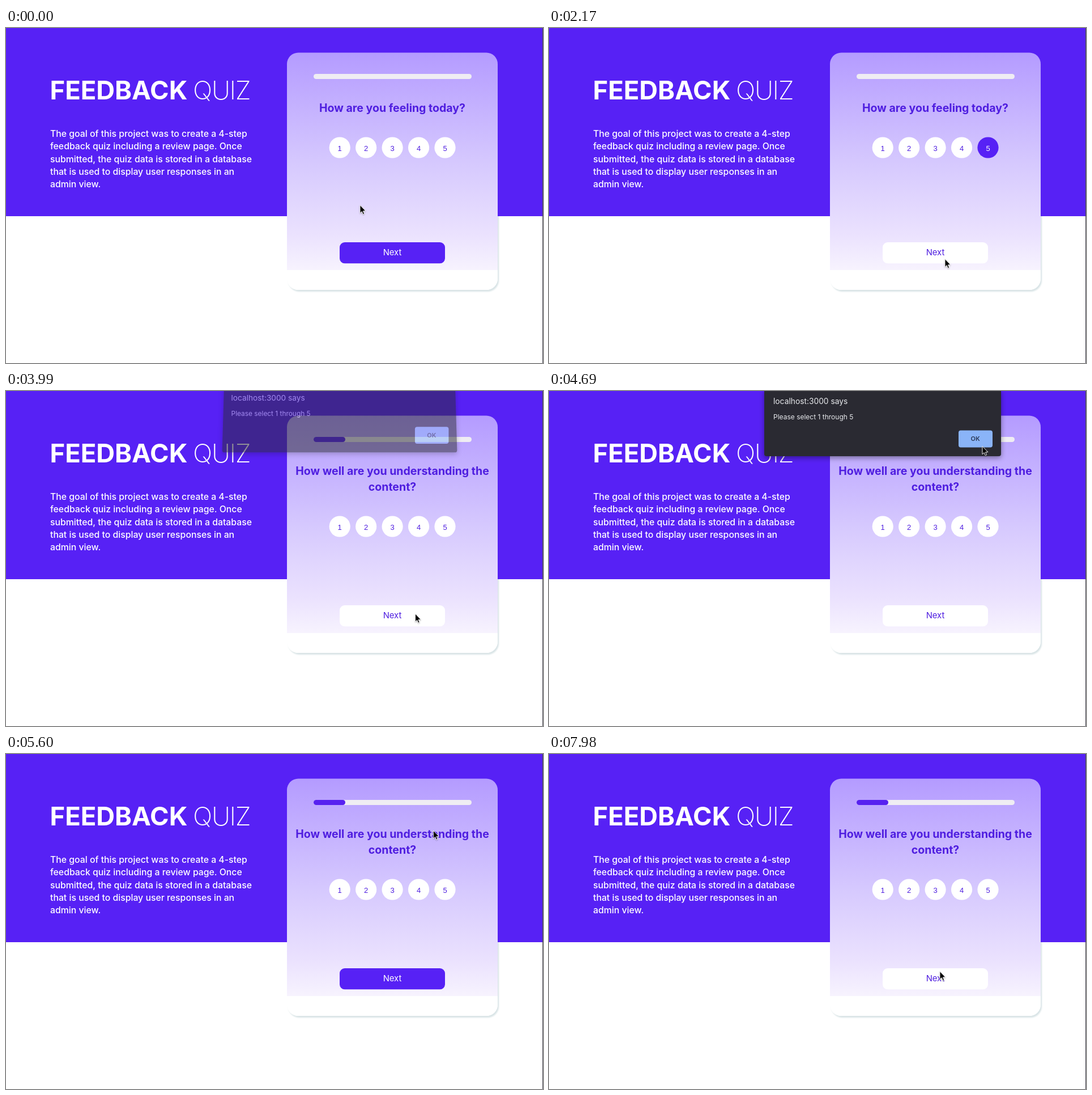
Animation, 948 px wide and 591 px high, one loop 8000 ms. Source, as an HTML page:

```html
<!DOCTYPE html>
<html lang="en">
<head>
<meta charset="utf-8">
<title>Feedback Quiz</title>
<style>
  html, body { margin: 0; width: 100%; height: 100%; overflow: hidden; background: #fff; }
  svg { display: block; width: 948px; height: 591px; }
  text { font-family: Inter, "Open Sans", sans-serif; }
  .body { font-size: 15.8px; font-weight: 500; fill: #fff; }
  .ask { font-size: 19.55px; font-weight: 700; fill: #4f1ee0; text-anchor: middle; }
  .num { font: 13px "Liberation Sans", Arial, sans-serif; text-anchor: middle; }
</style>
</head>
<body>
<svg viewBox="0 0 948 591">
  <defs>
    <linearGradient id="fade" gradientUnits="userSpaceOnUse" x1="0" y1="43" x2="0" y2="462">
      <stop offset="0" stop-color="#b49bff"/>
      <stop offset=".47" stop-color="#d6c9fe"/>
      <stop offset=".77" stop-color="#ebe2fe"/>
      <stop offset=".917" stop-color="#f7f3fe"/>
      <stop offset=".917" stop-color="#fff"/>
    </linearGradient>
    <filter id="cardShadow" x="-5%" y="-5%" width="110%" height="110%">
      <feDropShadow dx="2" dy="3" stdDeviation="0.8" flood-color="#d9e4e6"/>
    </filter>
    <filter id="boxShadow" x="-10%" y="-20%" width="120%" height="150%">
      <feDropShadow dx="0" dy="3" stdDeviation="5" flood-color="#000" flood-opacity=".4"/>
    </filter>
    <filter id="tipShadow" x="-50%" y="-50%" width="200%" height="200%">
      <feDropShadow dx="0" dy="1" stdDeviation="0.8" flood-color="#000" flood-opacity=".35"/>
    </filter>
    <rect id="card" x="496" y="43.5" width="372" height="418.5" rx="20"/>
  </defs>

  <rect width="948" height="591" fill="#fff"/>
  <use href="#card" fill="#fff" filter="url(#cardShadow)"/>
  <rect width="948" height="332" fill="#5721f5"/>
  <text x="77.5" y="126" font-size="45.4" font-weight="700" fill="#fff">FEEDBACK</text>
  <text x="330" y="126" font-size="45.4" font-weight="200" letter-spacing="-1.3" fill="#fff">QUIZ</text>
  <g id="intro"></g>

  <use href="#card" fill="url(#fade)"/>
  <rect x="543" y="81" width="279" height="9" rx="4.5" fill="#efedf3"/>
  <rect id="bar" x="543" y="81" width="56" height="9" rx="4.5" fill="#5721f0"/>
  <text class="ask" id="ask1" x="682" y="148"></text>
  <text class="ask" id="ask2" x="682" y="176"></text>
  <g id="choices"></g>
  <rect id="next" x="589" y="378" width="186" height="37.3" rx="9"/>
  <text id="nextText" x="682" y="401" font-size="14.8" text-anchor="middle">Next</text>

  <g id="dialog">
    <path id="panel" fill="#292c30" filter="url(#boxShadow)"/>
    <text x="396" y="23" font-size="13.8" fill="#e8eaed">localhost:3000 says</text>
    <text x="396" y="50" font-size="12" fill="#e8eaed">Please select 1 through 5</text>
    <rect id="ok" x="723" y="69.5" width="60" height="30" rx="4"/>
    <text x="752.7" y="88.3" font-size="11" font-weight="600" text-anchor="middle" fill="#2b3856">OK</text>
  </g>

  <rect x="947" width="1" height="591" fill="#45434d"/>
  <g id="cursor">
    <circle id="ring" r="20.3" fill="none" stroke="#15131c" stroke-width="1.6"/>
    <path d="M0 -.5V13.6L3.2 10.7L5.3 15.7L7.6 14.7L5.5 9.9L9.9 9.7Z" fill="#000"
      stroke="#fff" stroke-width=".9" stroke-linejoin="round" filter="url(#tipShadow)"/>
  </g>
</svg>
<script>
const LOOP = 8000, STEP = 70;
const PURPLE = '#5721f5', INK = '#4f1ee0';
const $ = id => document.getElementById(id);

function add(parent, tag, attrs, text = '') {
  const el = document.createElementNS('http://www.w3.org/2000/svg', tag);
  for (const k in attrs) el.setAttribute(k, attrs[k]);
  el.textContent = text;
  return parent.appendChild(el);
}
function set(el, attrs) {
  for (const k in attrs) el.setAttribute(k, attrs[k]);
}

[
  'The goal of this project was to create a 4-step',
  'feedback quiz including a review page. Once',
  'submitted, the quiz data is stored in a database',
  'that is used to display user responses in an',
  'admin view.'
].forEach((line, i) => add($('intro'), 'text', { class: 'body', x: 78, y: 192 + i * 22.3 }, line));

const choices = [1, 2, 3, 4, 5].map(n => {
  const x = 589.2 + (n - 1) * 46.45;
  return {
    disc: add($('choices'), 'circle', { cx: x, cy: 211, r: 18.6 }),
    label: add($('choices'), 'text', { class: 'num', x, y: 217 }, n)
  };
});

// Pointer path: time, x, y
const path = [
  [0, 625, 313], [490, 657.5, 302.5], [700, 657.5, 302.5],
  [1470, 777, 214], [1640, 777, 215], [2100, 700, 407], [2170, 699, 408],
  [2450, 710, 392], [2590, 711, 390.5], [2730, 711, 390.5],
  [3290, 733, 397], [3640, 722.5, 393.5], [4060, 722.5, 393.5],
  [4620, 765, 98], [4690, 765, 98], [5110, 765, 87], [5390, 765, 87],
  [5950, 731.5, 240.5], [6090, 731.5, 240.5], [6230, 752, 240],
  [6510, 755, 237], [7210, 705, 392], [7840, 690, 384], [LOOP, 690, 384]
];
const presses = [[490, 630], [1540, 1680], [2590, 2730], [3710, 3850], [5110, 5250], [5950, 6090], [7840, 7980]];

const within = (t, a, b) => t >= a && t < b;
const ramp = (t, a, b) => Math.min(1, Math.max(0, (t - a) / (b - a)));
const ease = p => p * p * (3 - 2 * p);

function pointer(t) {
  const i = path.findIndex(p => p[0] > t);
  const [t0, x0, y0] = path[i - 1], [t1, x1, y1] = path[i];
  const p = ease(ramp(t, t0, t1));
  return [x0 + (x1 - x0) * p, y0 + (y1 - y0) * p];
}

function drawDialog(t) {
  const opening = 1 - ramp(t, 3920, 4130);
  const closing = ramp(t, 5250, 5530);
  const tilt = Math.max(opening, closing);
  const inset = 5 * tilt;
  $('dialog').style.display = tilt < 1 ? '' : 'none';
  set($('dialog'), {
    opacity: 1 - (tilt < 0.5 ? tilt * 0.46 : 0.23 + (tilt - 0.5) * 1.54),
    transform: `translate(589 ${-8.6 * tilt}) scale(${1 - 0.012 * tilt}) translate(-589 0)`
  });
  set($('panel'), {
    d: `M${380 + inset} -2H${798 - inset}L798 111Q798 115 794 115H384Q380 115 380 111Z`
  });
  set($('ok'), { fill: closing > 0 ? '#9d8ecb' : '#8ab4f8' });
}

function draw(t) {
  const second = t >= 2730;
  const drop = second ? 28 : 0;
  const picked = within(t, 1540, 2590) ? 5 : within(t, 5950, 7840) ? 4 : 0;
  const [x, y] = pointer(t);

  $('bar').style.display = second ? '' : 'none';
  $('ask1').textContent = second ? 'How well are you understanding the' : 'How are you feeling today?';
  $('ask2').textContent = second ? 'content?' : '';
  choices.forEach(({ disc, label }, i) => {
    const on = picked === i + 1;
    set(disc, { cy: 211 + drop, fill: on ? PURPLE : '#fff' });
    set(label, { y: 217 + drop, fill: on ? '#fff' : INK });
  });

  const over = x > 589 && x < 775 && y > 378 && y < 415;
  const lit = over || within(t, 3850, 5460);
  set($('next'), { fill: lit ? '#fff' : PURPLE });
  set($('nextText'), { fill: lit ? INK : '#fff' });

  drawDialog(t);
  set($('cursor'), { transform: `translate(${x} ${y})` });
  $('ring').style.display = presses.some(([a, b]) => within(t, a, b)) ? '' : 'none';
}

const start = performance.now();
function tick() {
  const t = (performance.now() - start) % LOOP;
  draw(Math.floor(t / STEP) * STEP);
  requestAnimationFrame(tick);
}
draw(0);
requestAnimationFrame(tick);
</script>
</body>
</html>
```
